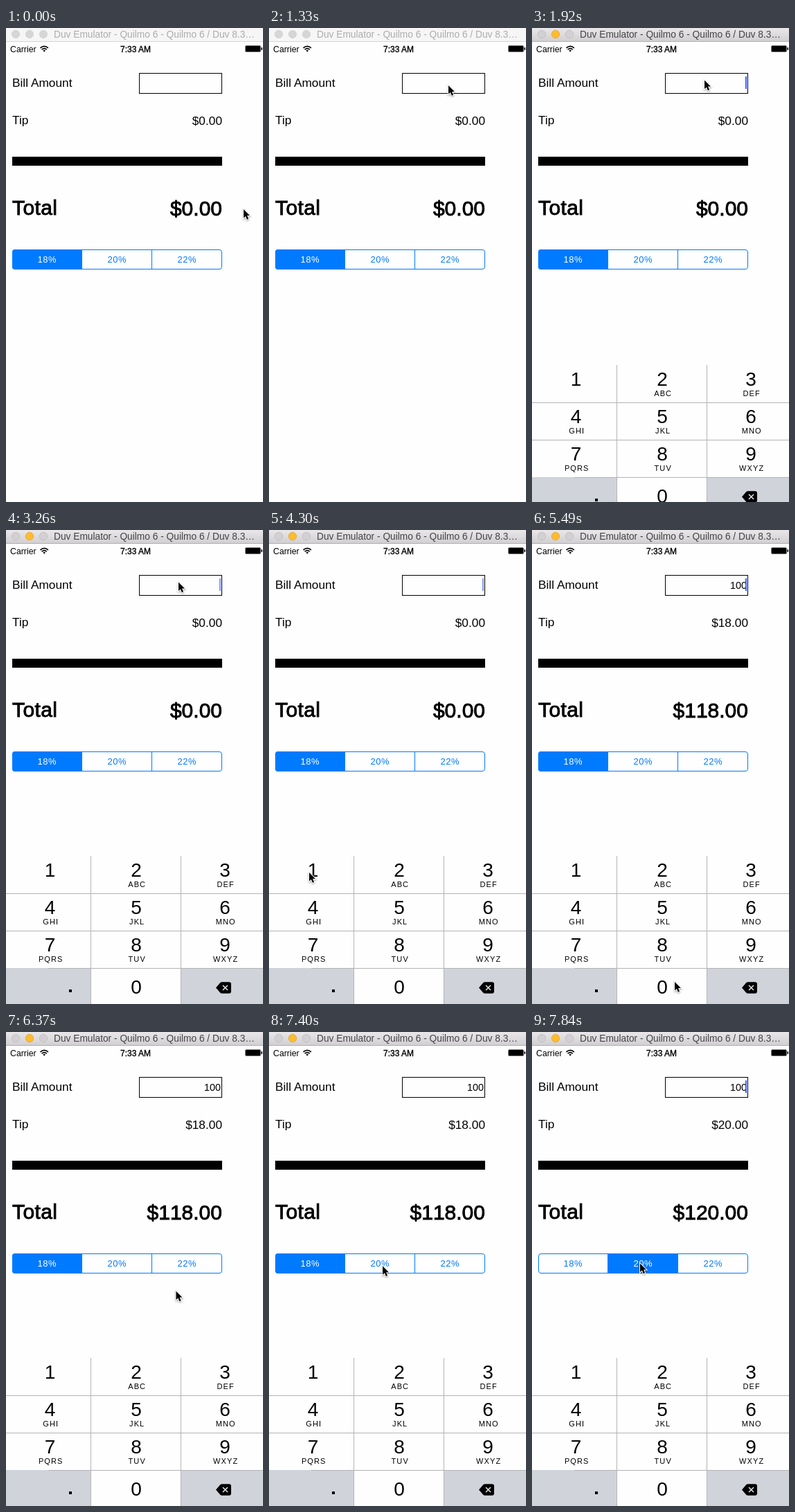
An HTML page for the animation above (7.99 s loop, 371 px wide and 685 px high).

```html
<!DOCTYPE html>
<html lang="en">
<head>
<meta charset="utf-8">
<title>Tip calculator</title>
<style>
  html, body { margin: 0; height: 100%; overflow: hidden; background: #fefefe; }
  svg { display: block; width: 371px; height: 685px; font-family: "Liberation Sans", Arial, sans-serif; }
  .label { font-size: 17.3px; }
  .big { font-size: 30px; stroke: #000; stroke-width: .9; }
  .num { text-anchor: end; font-kerning: none; }
  .mid { text-anchor: middle; }
  .seg { font-size: 13px; letter-spacing: .6px; }
  .digit { font-size: 28px; }
  .letters { font-size: 11px; letter-spacing: 1.1px; }
</style>
</head>
<body>
<svg viewBox="0 0 371 685">
  <defs>
    <linearGradient id="chrome" x2="0" y2="1">
      <stop stop-color="#e9e7e9"/><stop offset="1" stop-color="#d1cfd1"/>
    </linearGradient>
    <clipPath id="round"><rect x="9" y="320" width="303" height="29" rx="4"/></clipPath>
  </defs>

  <rect id="bar" width="371" height="19"/>
  <rect id="rule" y="19" width="371" height="1"/>
  <g id="lights"></g>
  <text id="title" x="69" y="14" font-size="13.74">Duv Emulator - Quilmo 6 - Quilmo 6 / Duv 8.3…</text>

  <text x="6" y="34.5" font-size="12.3">Carrier</text>
  <g fill="none" stroke="#000" stroke-width="1.7">
    <path d="M49.5 28.8q5.7-5 11.4 0M51.6 31.2q3.6-3.2 7.2 0"/>
    <path d="M53.3 32.6q1.9-1.6 3.8 0l-1.9 2z" fill="#000" stroke="none"/>
  </g>
  <text class="mid" x="187" y="34.5" font-size="12" stroke="#000" stroke-width=".35">7:33 AM</text>
  <rect x="345.5" y="25.5" width="22" height="9" rx="1.5" stroke="#777" stroke-width=".8"/>
  <rect x="368.4" y="28" width="1.6" height="4" rx=".8"/>

  <text class="label" x="9" y="84.5">Bill Amount</text>
  <rect x="192.5" y="65.5" width="119" height="29" fill="none" stroke="#000"/>
  <text id="bill" class="num" x="310" y="85" font-size="14.4"></text>
  <rect id="caret" x="308" y="70" width="2" height="18" fill="#3f62f0"/>
  <text class="label" x="9" y="138.7">Tip</text>
  <text id="tip" class="label num" x="312" y="139.7"></text>
  <rect x="9" y="186" width="303" height="13"/>
  <text class="big" x="9" y="269.5" letter-spacing=".4">Total</text>
  <text id="total" class="big num" x="312" y="270.5"></text>

  <g id="segments" clip-path="url(#round)"></g>
  <path d="M109.5 320v29M210.5 320v29" stroke="#007aff"/>
  <rect x="9.5" y="320.5" width="302" height="28" rx="3.5" fill="none" stroke="#007aff"/>
  <g id="rates"></g>

  <g id="pad">
    <rect y="471" width="371" height="214" fill="#fefefe"/>
    <path d="M0 633h122v52H0zM253 633h118v52H253z" fill="#d0d3da"/>
    <rect id="press" fill="#d0d3da"/>
    <path d="M122.5 471v214M252.5 471v214M0 525.5h371M0 579.5h371M61 633.5h310" stroke="#b4b4b6"/>
    <g id="keys"></g>
    <rect x="91" y="664" width="4" height="4"/>
    <path d="M303 661.5l6-7q1-1.2 3-1.2h10q3 0 3 3v10.4q0 3-3 3h-10q-2 0-3-1.2z"/>
    <path d="M313 658l7 7m0-7l-7 7" stroke="#e4e6ea" stroke-width="1.5"/>
  </g>

  <path id="cursor" d="M0 0V12.6l2.9-2.7 2 4.8 2.2-.9-2-4.7H9z" stroke="#fff" stroke-width="2"
    paint-order="stroke" style="filter: drop-shadow(0 1px 1px #0006)"/>
</svg>

<script>
const LOOP = 7990, TICKS = 54, TICK = LOOP / TICKS;
const BLUE = '#007aff';
const $ = id => document.getElementById(id);
const set = (id, attrs) => { for (const k in attrs) $(id).setAttribute(k, attrs[k]); };
const text = (cls, x, y, s) => `<text class="${cls} mid" x="${x}" y="${y}">${s}</text>`;

$('lights').innerHTML = [14, 34, 54].map(x => `<circle cx="${x}" cy="9" r="5.7"/>`).join('');
$('segments').innerHTML = [9, 109, 210].map(x =>
  `<rect x="${x}" y="320" width="${x === 9 ? 101 : 102}" height="29" fill="${BLUE}"/>`).join('');
$('rates').innerHTML = [18, 20, 22].map((r, i) => text('seg', 59.3 + 101 * i, 339, r + '%')).join('');

const letters = ['', 'ABC', 'DEF', 'GHI', 'JKL', 'MNO', 'PQRS', 'TUV', 'WXYZ'];
$('keys').innerHTML = letters.map((s, i) => {
  const x = [63.5, 188, 316][i % 3], y = 501 + 54 * Math.floor(i / 3);
  return text('digit', x, y, i + 1) + text('letters', x + 1.2, y + 15, s);
}).join('') + text('digit', 188, 670, 0);

// Pointer stops: tick, x, y
const path = [
  [0, 343, 262], [2, 325, 232], [5, 262, 128], [7, 241, 95], [9, 259, 83], [10, 249, 75.5],
  [22, 249, 75.5], [24, 205, 190], [26, 70, 420], [27, 17, 500], [28, 36, 528], [29, 58, 495],
  [31, 58, 495], [34, 206, 653], [37, 206, 653], [39, 218, 560], [41, 237, 425],
  [43, 245.5, 374.5], [44, 244, 381], [46, 225, 368], [49, 172, 342], [51, 156, 334.5], [54, 156, 334.5]
];
const blink = [1, 1, 1, .65, .3, 0, 0];

function pointer(n) {
  const i = path.findIndex(p => p[0] > n);
  const [a, b] = [path[i - 1], path[i]];
  const u = (n - a[0]) / (b[0] - a[0]);
  return [1, 2].map(k => a[k] + (b[k] - a[k]) * u);
}

function draw(n) {
  const active = n >= 10;
  set('bar', { fill: active ? 'url(#chrome)' : '#f6f6f6' });
  set('rule', { fill: active ? '#b3b1b3' : '#d4d4d4' });
  set('title', { fill: active ? '#444' : '#acacac' });
  [...$('lights').children].forEach((c, i) => {
    c.setAttribute('fill', !active ? '#d6d6d6' : i === 1 ? '#fdbc2f' : '#d2d0d2');
    c.setAttribute('stroke', !active ? '#d0d0d0' : i === 1 ? '#e0a028' : '#bab8ba');
    c.setAttribute('stroke-width', .7);
  });

  const bill = n < 31 ? '' : n < 36 ? '1' : n < 37 ? '10' : '100';
  const rate = n < 52 ? .18 : .2;
  $('bill').textContent = bill;
  $('tip').textContent = '$' + (bill * rate).toFixed(2);
  $('total').textContent = '$' + (bill * (1 + rate)).toFixed(2);

  const reset = [37, 32, 12].find(t => n >= t);
  set('caret', { opacity: reset ? blink[(n - reset) % 7] : 0 });

  const fill = n < 52 ? [1, 0, 0] : n < 53 ? [.4, 1, 0] : [0, 1, 0];
  fill.forEach((f, i) => {
    $('segments').children[i].setAttribute('opacity', f);
    $('rates').children[i].setAttribute('fill', f === 1 ? '#fff' : BLUE);
  });

  // Keypad rises on a critically damped spring
  const s = 18.3 * Math.max(0, n * TICK - 1691) / 1000;
  set('pad', {
    transform: `translate(0 ${Math.round(216 * (1 + s) * Math.exp(-s))})`,
    visibility: n < 12 ? 'hidden' : 'visible'
  });
  const one = n === 30, zero = n === 35;
  set('press', {
    x: one ? 0 : 123, y: one ? 471 : 634,
    width: one ? 122 : 129, height: one ? 54 : 51, opacity: one || zero ? 1 : 0
  });

  set('cursor', { transform: `translate(${pointer(n)})` });
}

let start;
function loop(now) {
  start ??= now;
  const t = (now - start) % LOOP;
  draw(Math.min(TICKS - 1, Math.floor((t + 6) / TICK)));
  requestAnimationFrame(loop);
}
draw(0);
requestAnimationFrame(loop);
</script>
</body>
</html>
```
